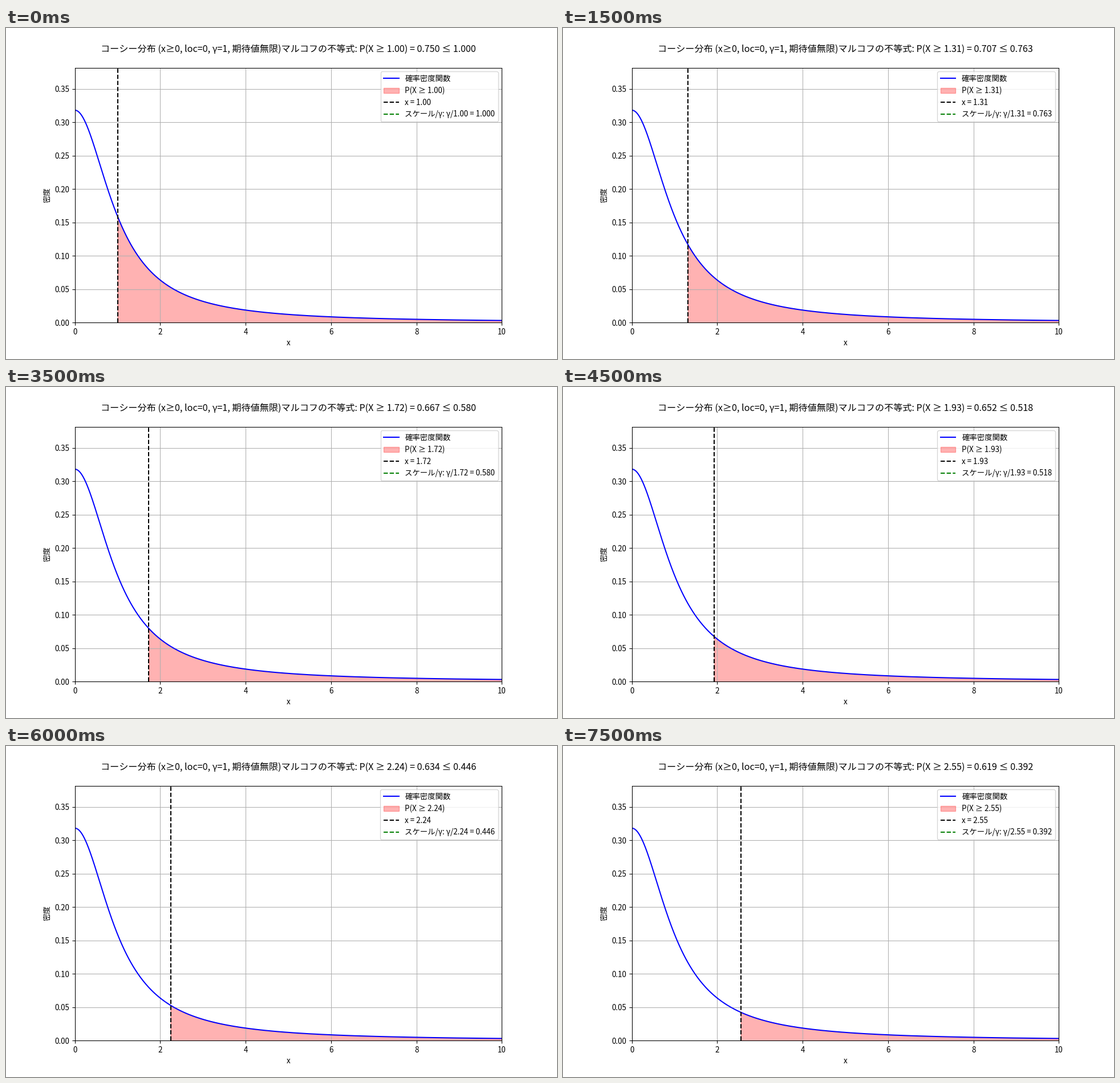
A matplotlib script that plays this animation: 966x580 px, repeating every 8 s.

```python
import numpy as np
import matplotlib.pyplot as plt
from matplotlib.animation import FuncAnimation

plt.rcParams["font.family"] = "Noto Sans CJK JP"

DPI = 96.6
FRAMES = 16
INTERVAL = 500

# The small margin keeps the pixel size from being truncated.
fig, ax = plt.subplots(figsize=(966.001 / DPI, 580.001 / DPI), dpi=DPI)

x = np.linspace(0, 10, 1000)
pdf = 1 / (np.pi * (1 + x**2))
thresholds = np.linspace(1, 4, 30)


def update(i):
    a = thresholds[i]
    prob = 1 - np.arctan(a) / np.pi
    bound = 1 / a

    ax.clear()
    ax.plot(x, pdf, color="blue", label="確率密度関数")
    ax.fill_between(x, pdf, where=x >= a, color="red", alpha=0.3,
                    label=f"P(X ≥ {a:.2f})")
    ax.axvline(a, color="black", linestyle="--", label=f"x = {a:.2f}")
    ax.axhline(bound, color="green", linestyle="--",
               label=f"スケール/γ: γ/{a:.2f} = {bound:.3f}")

    ax.set_xlim(0, 10)
    ax.set_ylim(0, 1.2 * pdf.max())
    ax.set_xlabel("x")
    ax.set_ylabel("密度")
    ax.set_title("コーシー分布 (x≥0, loc=0, γ=1, 期待値無限)"
                 f"マルコフの不等式: P(X ≥ {a:.2f}) = {prob:.3f} ≤ {bound:.3f}",
                 pad=20)
    ax.legend(loc="upper right")
    ax.grid(True)


anim = FuncAnimation(fig, update, frames=FRAMES, interval=INTERVAL,
                     repeat=True, repeat_delay=0)
plt.show()
```
